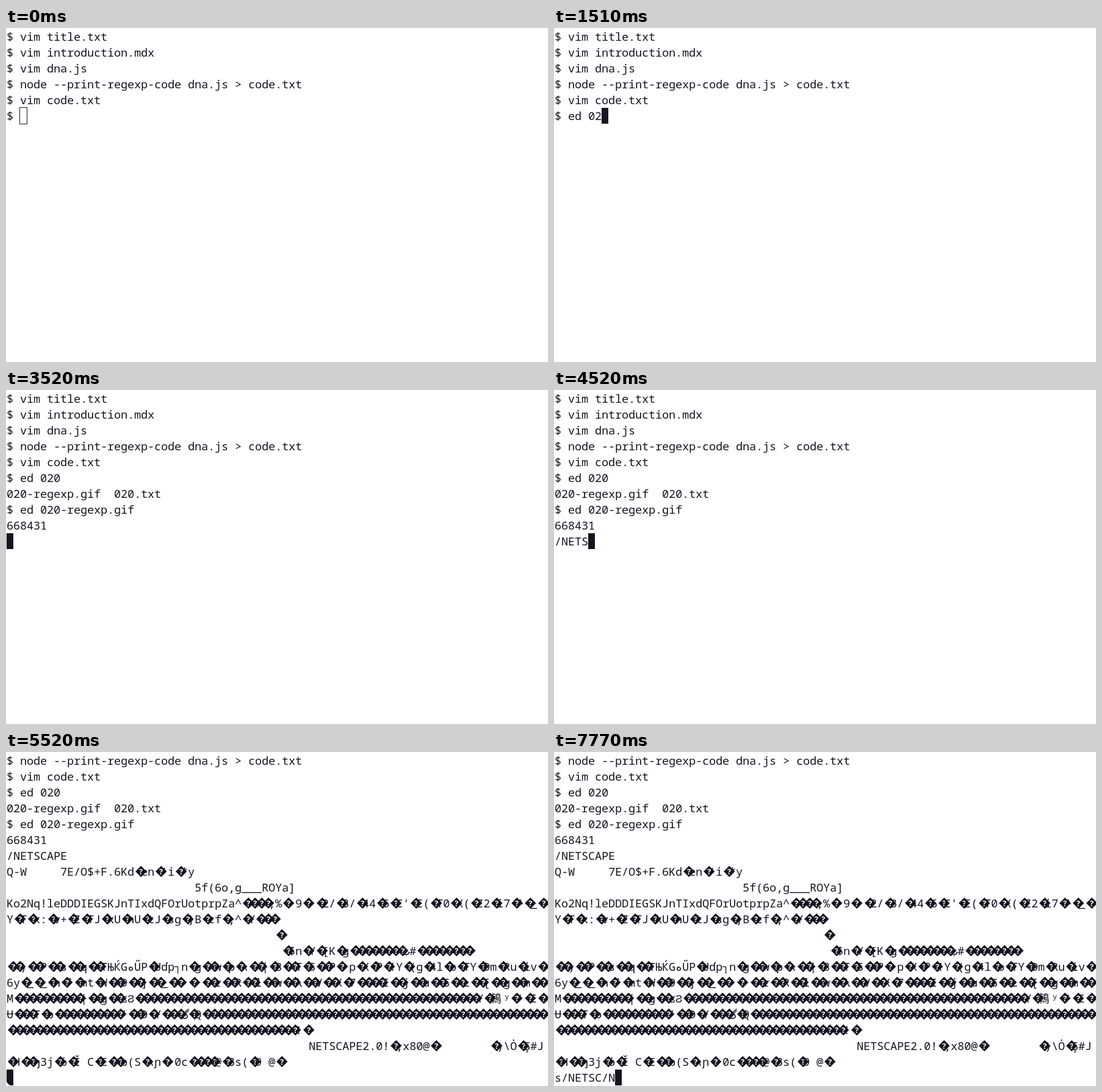
Animation of 888 by 548 pixels, one loop 8000 ms. Source, as an HTML page with a canvas:

```html
<!DOCTYPE html>
<html lang="en">
<head>
<meta charset="utf-8">
<title>Terminal session</title>
<style>
  html, body { margin: 0; width: 100%; height: 100%; overflow: hidden; background: #fff; }
  canvas { display: block; }
</style>
</head>
<body>
<canvas id="term" width="888" height="548"></canvas>
<script>
const ctx = document.getElementById('term').getContext('2d');
const LOOP = 8000;
const CELL_W = 11, CELL_H = 26, PAD = 1, BASELINE = 20;
const INK = '#171421', PAPER = '#fff';
const FONT = '18.67px "Noto Sans Mono", "Noto Sans", "Noto Sans CJK SC", "Noto Sans CJK JP", "DejaVu Sans Mono", monospace';
const MARK_FONT = 'bold 13px "Noto Sans", sans-serif';

// Undecodable bytes and blank cells
const bad = n => '\uFFFD'.repeat(n);
const gap = n => ' '.repeat(n);

const shell = [
  '$ vim title.txt',
  '$ vim introduction.mdx',
  '$ vim dna.js',
  '$ node --print-regexp-code dna.js > code.txt',
  '$ vim code.txt'
];
const listed = [...shell, '$ ed 020', '020-regexp.gif  020.txt'];
const editor = [...listed, '$ ed 020-regexp.gif', '668431'];
const binary = [
  "Q-W     7E/O$+F.6Kd�en�'i�*y",
  gap(28) + '5f(6o,g___ROYa]',
  'Ko2Nq!leDDDIEGSKJnTIxdQFOrUotprpZa^' + bad(4) +
    ";%� 9� �2/�3/�44�6�C'�E(�T0�X(�Z2�i7�^�_�",
  'Y�T�x:�v+�Z�TJ�kU�nU�tJ�sg�}B�cf�,^�Y���',
  gap(40) + '�',
  gap(41) + '�$n�Y�[K�g' + bad(8) + 'ب#' + bad(8),
  '��)��P��s��q��THЌGهŰP�Uɗр┐n�g��w�p�\\��|�8��T�S��P� p�X�P�!Y�(g�4l�o�TY�Dm�Ru�iv�'
    .replace('THЌ', 'TЊЌ').replace('S��P', 'S�' + '�P'),
  '6y�_�_�h�`�mt�W��9��]��_�� � ��r��R��l��w��λ��V��X�7' + bad(4) +
    'I��j��u��S��L��[��g��m��',
  'M' + bad(10) + '|��g��≤Ϩ' + bad(51) + "Y�鵫 ʸ�'�Σ�",
  'Ʉ���T�b' + bad(10) + 'ʻ��D�Y���گ�Q' + bad(51),
  bad(43) + '!�',
  gap(45) + 'NETSCAPE2.0!�;x80@�' + gap(8) + '�)\\Ȯ�Ş#J',
  '�H��ŋ3j�ȯ�Ǐ C�E��b(S�\\ɲ� 0c����@�3s(�9 @�'
];
const dump = [...editor.slice(3), '/NETSCAPE', ...binary];

// [start ms, finished lines, line being typed, hollow cursor]
const steps = [
  [0, shell, '$ ', true],
  [250, shell, '$ '],
  [500, shell, '$ e'],
  [750, shell, '$ ed'],
  [1000, shell, '$ ed '],
  [1260, shell, '$ ed 0'],
  [1510, shell, '$ ed 02'],
  [1760, shell, '$ ed 020'],
  [2010, listed, '$ ed 020'],
  [2260, listed, '$ ed 020-regexp.gif '],
  [2520, editor, ''],
  [3770, editor, '/'],
  [4020, editor, '/N'],
  [4270, editor, '/NET'],
  [4520, editor, '/NETS'],
  [4770, editor, '/NETSCA'],
  [5020, editor, '/NETSCAP'],
  [5270, editor, '/NETSCAPE'],
  [5520, dump, ''],
  [6520, dump, 's'],
  [6770, dump, 's/N'],
  [7020, dump, 's/NET'],
  [7270, dump, 's/NETS'],
  [7520, dump, 's/NETSC/'],
  [7770, dump, 's/NETSC/N']
];

function drawBad(x, y) {
  const cx = x + 11.2, cy = y + 13, r = 9.2;
  ctx.beginPath();
  ctx.moveTo(cx - r, cy);
  ctx.lineTo(cx, cy - r);
  ctx.lineTo(cx + r, cy);
  ctx.lineTo(cx, cy + r);
  ctx.fill();
  ctx.font = MARK_FONT;
  ctx.textAlign = 'center';
  ctx.fillStyle = PAPER;
  ctx.fillText('?', cx, cy + 4.6);
  ctx.font = FONT;
  ctx.textAlign = 'left';
  ctx.fillStyle = INK;
}

function drawLine(line, row) {
  const y = PAD + row * CELL_H;
  [...line].forEach((ch, col) => {
    const x = PAD + col * CELL_W;
    if (ch === '\uFFFD') drawBad(x, y);
    else if (ch !== ' ') ctx.fillText(ch, x, y + BASELINE);
  });
}

function drawCursor(col, row, hollow) {
  const x = PAD + col * CELL_W, y = PAD + row * CELL_H;
  if (hollow) ctx.strokeRect(x - 0.5, y - 0.5, CELL_W + 1, CELL_H + 1);
  else ctx.fillRect(x, y, CELL_W, CELL_H);
}

function draw([, lines, typed, hollow]) {
  ctx.fillStyle = PAPER;
  ctx.fillRect(0, 0, 888, 548);
  ctx.save();
  ctx.beginPath();
  ctx.roundRect(0, 0, 888, 548, 12);
  ctx.clip();
  ctx.fillStyle = ctx.strokeStyle = INK;
  ctx.font = FONT;
  [...lines, typed].forEach(drawLine);
  drawCursor(typed.length, lines.length, hollow);
  ctx.restore();
}

let shown;
const start = performance.now();
function tick() {
  const t = (performance.now() - start) % LOOP;
  const step = steps.findLast(s => s[0] <= t);
  if (step !== shown) draw(shown = step);
  requestAnimationFrame(tick);
}
tick();
</script>
</body>
</html>
```
